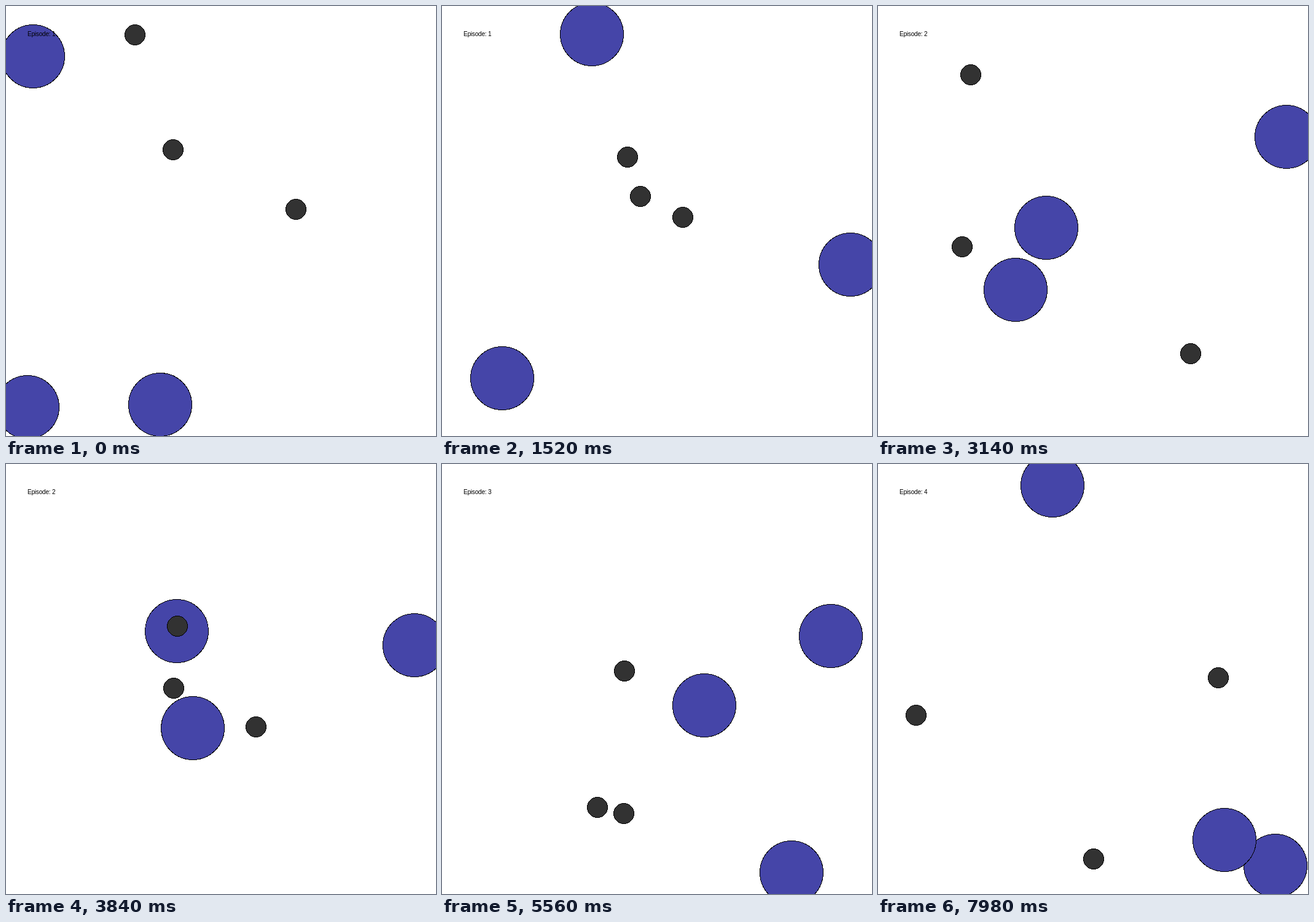
Recreate the animation shown at these times as an HTML page. Size 700x700 px, loop 8 s.

```html
<!DOCTYPE html>
<html lang="en">
<head>
<meta charset="utf-8">
<title>Episodes</title>
<style>
  html, body { margin: 0; width: 100%; height: 100%; overflow: hidden; background: #fff; }
  svg { display: block; width: 100%; height: 100%; }
  circle { stroke: #000; stroke-width: 1; shape-rendering: crispEdges; }
  .agent { fill: #4545a8; }
  .mark { fill: #323232; }
  text { font: 10px "Liberation Sans", Arial, sans-serif; letter-spacing: -.2px; }
</style>
</head>
<body>
<svg id="stage" viewBox="0 0 700 700"></svg>
<script>
const LOOP = 8000, EPISODE = 2320, HALF = 350, REACH = 315;

// Marks stand still; agents pass through [step, x, y] under constant thrust.
const episodes = [
  {
    marks: [[-140, -303], [-78, -116], [122, -19]],
    agents: [
      [[0, -306, -268], [8, -308, -527], [18, -310, -985]],
      [[0, -315, 303], [8, -269, 361], [18, -860, 850], [23, -1200, 1430]],
      [[0, -99, 299], [8, 236, 239], [18, 1100, 200], [23, 1550, 180]]
    ]
  },
  {
    marks: [[-263, -315], [-282, 56], [211, 286]],
    agents: [
      [[0, -167, -164], [9, 417, -181]],
      [[0, -166, 34], [9, -167, 148]],
      [[0, 27, 253], [9, -101, 15]]
    ]
  },
  {
    marks: [[-76, -18], [-139, 300], [-77, 315]],
    agents: [
      [[0, 76, -20], [10, 111, 62]],
      [[0, 180, -27], [10, 407, -101], [23, 940, -250]],
      [[0, 124, 205], [10, 315, 453]]
    ]
  },
  {
    marks: [[-301, 62], [1, 306], [213, -2]],
    agents: [
      [[0, -100, -315], [11, -69, -329]],
      [[0, 268, 170], [11, 310, 317]],
      [[0, 130, 190], [11, 224, 274]]
    ]
  }
];

const stage = document.getElementById("stage");

function add(tag, attrs) {
  const el = document.createElementNS("http://www.w3.org/2000/svg", tag);
  for (const name in attrs) el.setAttribute(name, attrs[name]);
  return stage.appendChild(el);
}

const dots = [0, 1, 2, 3, 4, 5].map(i => add("circle", i < 3
  ? { class: "agent", r: 51.5 }
  : { class: "mark", r: 16.5 }));
const label = add("text", { x: 35, y: 49 });

// Distance covered from rest when a quarter of the speed is lost each step.
function travel(step) {
  const n = Math.max(0, step - 1);
  return 2 * (n - 3 * (1 - 0.75 ** n));
}

function locate(path, step) {
  let i = 1;
  while (i < path.length - 1 && step > path[i][0]) i++;
  const [k0, x0, y0] = path[i - 1], [k1, x1, y1] = path[i];
  const f = (travel(step) - travel(k0)) / (travel(k1) - travel(k0));
  return [x0 + (x1 - x0) * f, y0 + (y1 - y0) * f];
}

function draw(time) {
  const index = Math.floor(time / EPISODE);
  const local = time - index * EPISODE;
  const step = local < 20 ? 0 : 1 + Math.floor((local - 20) / 100);
  const { marks, agents } = episodes[index];
  const points = agents.map(path => locate(path, step)).concat(marks);

  // The view zooms so that the outermost point stays at a fixed reach.
  const zoom = REACH / Math.max(...points.flat().map(Math.abs));
  points.forEach(([x, y], i) => {
    dots[i].setAttribute("cx", Math.round(HALF + x * zoom));
    dots[i].setAttribute("cy", Math.round(HALF + y * zoom));
  });
  label.textContent = "Episode: " + (index + 1);
}

const start = performance.now();
function tick() {
  draw((performance.now() - start) % LOOP);
  requestAnimationFrame(tick);
}
tick();
</script>
</body>
</html>
```
